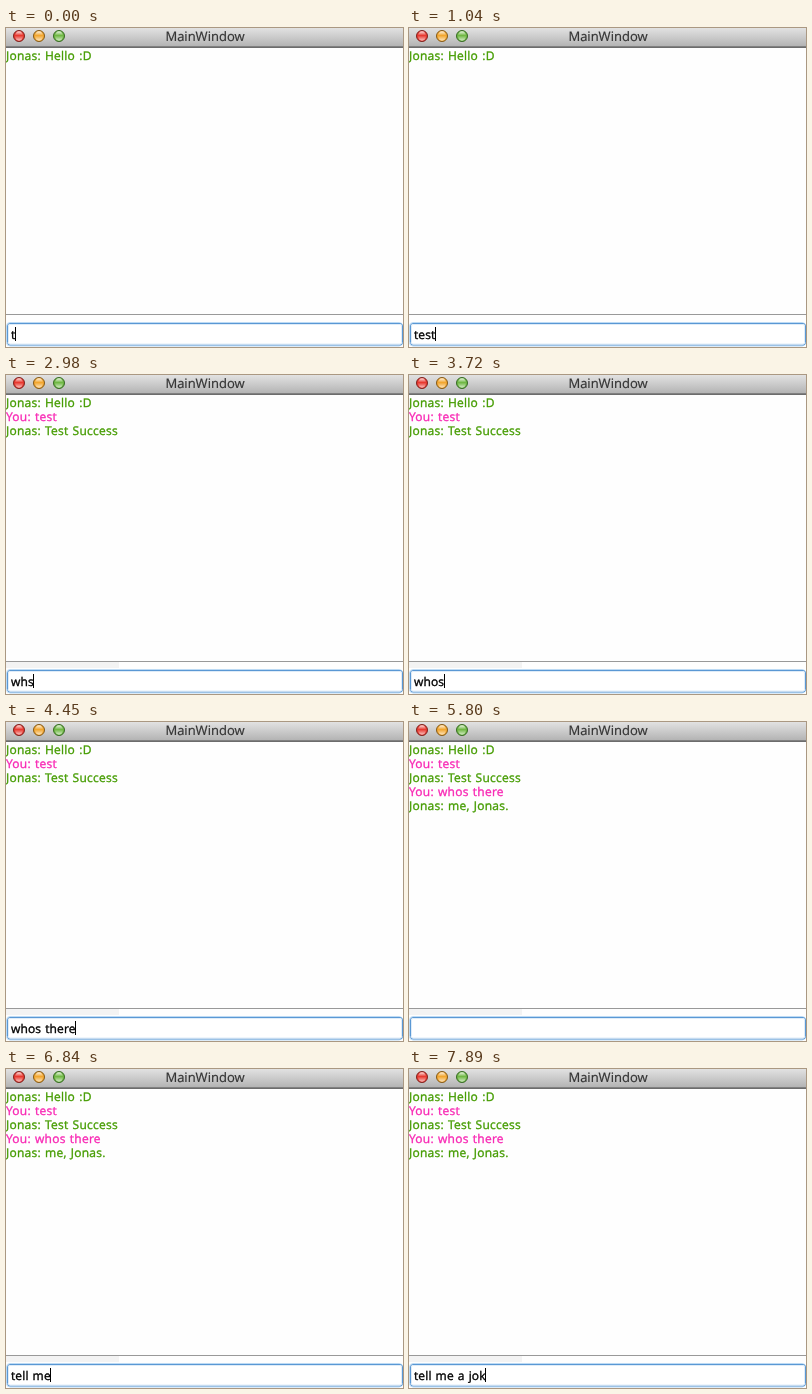
An HTML page for the animation above (8 s loop, 397 by 319 pixels).

```html
<!DOCTYPE html>
<html lang="en">
<head>
<meta charset="utf-8">
<title>MainWindow</title>
<style>
  html, body { margin: 0; width: 100%; height: 100%; overflow: hidden; background: #fff; }
  svg { display: block; width: 100vw; height: 100vh; }
  text {
    font: 12px "Open Sans", "Noto Sans", sans-serif; white-space: pre; text-rendering: geometricPrecision;
    fill: currentColor; stroke: currentColor; stroke-width: .35px;
  }
  .title { font-size: 13px; text-anchor: middle; color: #333; stroke-width: .2px; }
  .chat text { letter-spacing: .24px; word-spacing: .8px; color: #459c00; }
  .chat .you { color: #f828b4; }
  #typed { letter-spacing: .13px; word-spacing: .8px; color: #000; }
</style>
</head>
<body>
<svg viewBox="0 0 397 319">
  <defs>
    <linearGradient id="bar" x2="0" y2="1">
      <stop stop-color="#e2e2e2"/><stop offset="1" stop-color="#b4b4b4"/>
    </linearGradient>
    <linearGradient id="shine" x2="0" y2="1">
      <stop stop-color="#fff" stop-opacity=".85"/>
      <stop offset=".45" stop-color="#fff" stop-opacity="0"/>
      <stop offset="1" stop-color="#fff" stop-opacity=".7"/>
    </linearGradient>
  </defs>
  <rect width="397" height="319" fill="#fefefe"/>
  <rect width="397" height="18" fill="url(#bar)"/>
  <rect y="18" width="397" height="1" fill="#808080"/>
  <rect y="19" width="397" height="1" fill="#6c6c6c"/>
  <g id="buttons"></g>
  <text class="title" x="199" y="13">MainWindow</text>
  <g id="chat" class="chat"></g>
  <rect y="286" width="397" height="1" fill="#999"/>
  <rect id="strip" y="287" width="113" height="6" fill="#f3f3f3"/>
  <g fill="none">
    <rect x=".5" y="294.5" width="396" height="23.5" rx="3.5" stroke="#bcdaf4"/>
    <rect x="1.5" y="295.5" width="395" height="21.5" rx="2.5" fill="#fff" stroke="#5a98d4"/>
    <rect x="2.5" y="296.5" width="393" height="19.5" rx="1.5" stroke="#dfecf8"/>
  </g>
  <text id="typed" x="5" y="311"></text>
  <rect id="caret" y="299" width="1" height="14"/>
</svg>
<script>
  const LOOP = 8000;
  const $ = id => document.getElementById(id);

  function add(parent, tag, attrs, label = "") {
    const el = document.createElementNS("http://www.w3.org/2000/svg", tag);
    for (const key in attrs) el.setAttribute(key, attrs[key]);
    el.textContent = label;
    parent.append(el);
    return el;
  }

  [["#e8382f", "#7d2420"], ["#f2a62e", "#835a1a"], ["#6fb843", "#386a26"]].forEach(([fill, stroke], i) => {
    const pos = { cx: 13 + 20 * i, cy: 8 };
    add($("buttons"), "circle", { ...pos, r: 5.5, fill, stroke });
    add($("buttons"), "ellipse", { ...pos, rx: 4, ry: 4.7, fill: "url(#shine)" });
  });

  const messages = [
    [0, "Jonas: Hello :D"],
    [1190, "You: test"],
    [1190, "Jonas: Test Success"],
    [4600, "You: whos there"],
    [4600, "Jonas: me, Jonas."]
  ].map(([at, line], i) => ({
    at,
    el: add($("chat"), "text", { x: 0, y: 32 + 14 * i, class: line.startsWith("You") ? "you" : "bot" }, line)
  }));

  // [time, field content]
  const typing = [
    [0, "t"], [600, "te"], [750, "tes"], [1040, "test"], [1190, ""],
    [2530, "w"], [2680, "wh"], [2980, "whs"], [3280, "wh"], [3570, "who"], [3720, "whos"],
    [3870, "whos "], [4020, "whos t"], [4160, "whos th"], [4310, "whos the"], [4450, "whos there"], [4600, ""],
    [5950, "t"], [6100, "te"], [6250, "tel"], [6390, "tell"], [6540, "tell "], [6690, "tell m"], [6840, "tell me"],
    [6990, "tell me "], [7140, "tell me a "], [7590, "tell me a j"], [7740, "tell me a jo"], [7890, "tell me a jok"]
  ];
  const blinks = [[2230, 2530], [5800, 5950]];

  const show = (el, on) => el.setAttribute("visibility", on ? "visible" : "hidden");

  function draw(t) {
    for (const { at, el } of messages) show(el, t >= at);
    show($("strip"), t >= 1190);
    const value = typing.findLast(([at]) => t >= at)[1];
    const field = $("typed");
    if (field.textContent !== value) field.textContent = value;
    const width = value ? field.getComputedTextLength() : 0;
    $("caret").setAttribute("x", Math.floor(5 + width));
    show($("caret"), !blinks.some(([from, to]) => t >= from && t < to));
  }

  const start = performance.now();
  function tick() {
    draw((performance.now() - start) % LOOP);
    requestAnimationFrame(tick);
  }
  tick();
</script>
</body>
</html>
```
